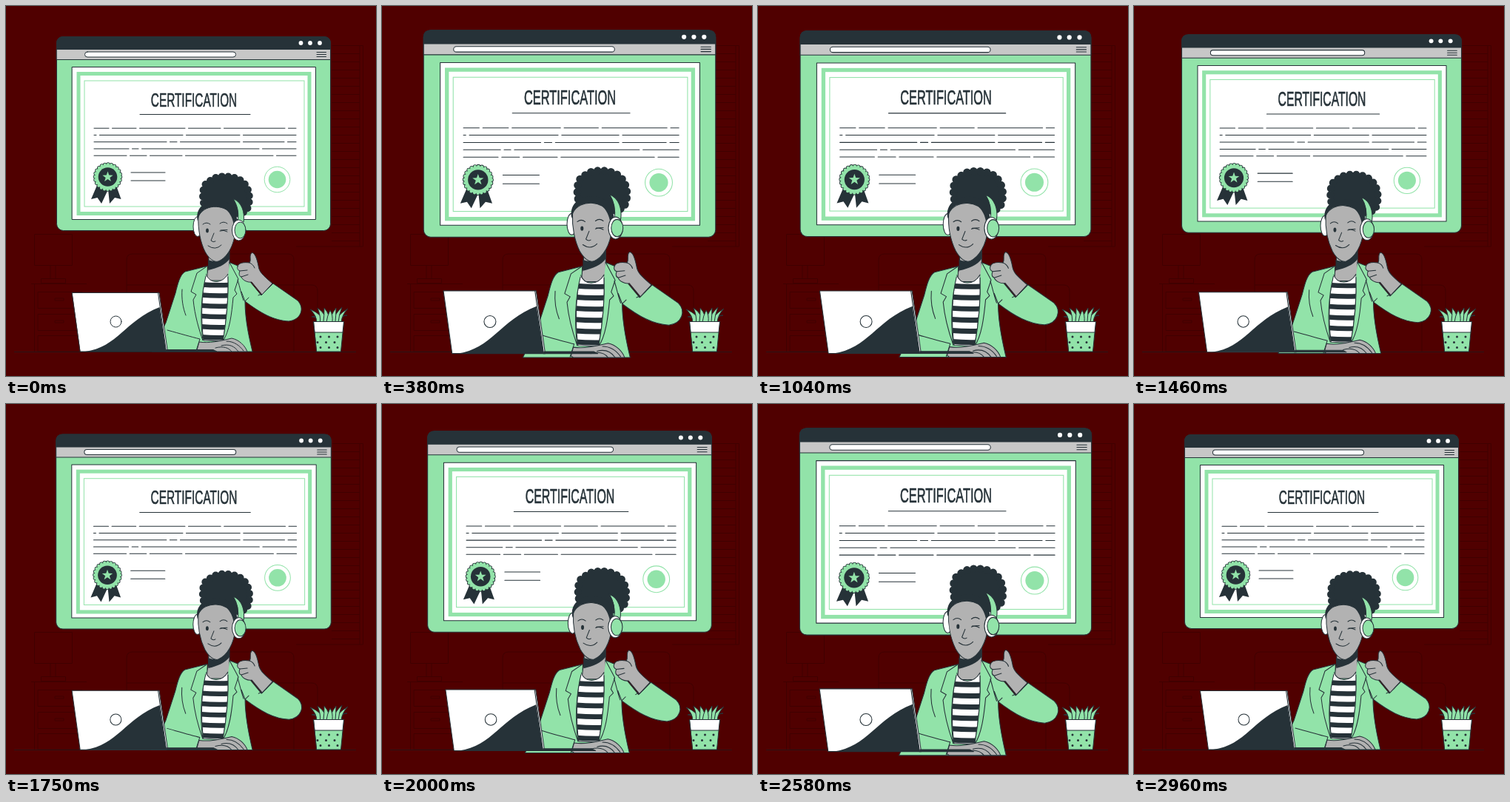
An HTML page that plays this animation: 500 by 500 pixels, repeating every 3 s.

```html
<!DOCTYPE html>
<html lang="en">
<head>
<meta charset="utf-8">
<title>Certification</title>
<style>
  html, body { margin: 0; height: 100%; overflow: hidden; background: #500000; }
  svg { display: block; width: 100vw; height: 100vh; --ink: #263238; --green: #92e3a9; --skin: #b2b2b2; }
  .ink { fill: var(--ink); }
  .green { fill: var(--green); }
  .skin { fill: var(--skin); }
  .white { fill: #fff; }
  .line { stroke: var(--ink); stroke-width: 1; stroke-linejoin: round; stroke-linecap: round; }
  .none { fill: none; }
  .edge { stroke: var(--green); fill: none; }
  .room { fill: none; stroke: #400000; stroke-width: 1; }
  .bumps { stroke-linecap: round; }
  text { font: 26.5px "Liberation Sans", Arial, sans-serif; text-anchor: middle; stroke: var(--ink); stroke-width: .7; }
</style>
</head>
<body>
<svg viewBox="0 0 500 500">
  <g class="room">
    <path id="blinds"/>
    <path d="M38.5 308.5h51v42h-51zM60 350.5v18M67 350.5v18M47.5 368.5h33v6h-33zM34 375.5h75M38.5 375.5V467M43 386.5h60v22H43zM43 416.5h60v22H43zM43 445.5h60V467H43zM66 395h12v3H66zM66 425h12v3H66z"/>
    <path d="M163 467V343q0-8 8-8h210q8 0 8 8V467M163 377h226M389 377h24q8 0 8 8v82"/>
  </g>
  <path d="M11 467.5H473" class="none" stroke="#2b1517"/>

  <g id="window">
    <rect x="68.5" y="41.5" width="370" height="262" rx="9" class="green line"/>
    <path d="M68.5 58.500V50.500q0-9 9-9h352q9 0 9 9v8z" class="ink line"/>
    <path d="M68.500 58.500h370v14h-370z" fill="#c7c7c7" class="line"/>
    <rect x="106.500" y="62" width="204" height="7" rx="3.500" class="white line"/>
    <g class="white"><circle cx="398.500" cy="50" r="2.900"/><circle cx="411" cy="50" r="2.900"/><circle cx="424" cy="50" r="2.900"/></g>
    <path d="M420 62.500h12.500m-12.500 3h12.500m-12.500 3h12.500" class="none line"/>
    <rect x="89.500" y="82.500" width="329" height="206" class="white line"/>
    <rect x="98" y="91.500" width="312" height="189" class="edge" stroke-width="5"/>
    <rect x="106" y="101" width="297" height="170" class="edge"/>
    <text transform="translate(254 135.500) scale(.58 1)" class="ink">CERTIFICATION</text>
    <path d="M181 146.500H330M169 225H215M169 236H215" class="line"/>
    <path id="writing" class="line"/>
    <path d="M124 240L115 261L123.500 259L129 267L138 248L140 267L147 259L155.500 261L148 240z" class="ink"/>
    <circle cx="137.500" cy="231" r="17" class="none line bumps" style="stroke-width:5.500" stroke-dasharray="0 4.450"/>
    <circle cx="137.500" cy="231" r="17" class="green bumps" stroke="#92e3a9" stroke-width="4" stroke-dasharray="0 4.450"/>
    <circle cx="137.500" cy="231" r="12.800" class="ink"/>
    <path id="star" class="green"/>
    <circle cx="366.500" cy="234.500" r="17.300" class="edge"/>
    <circle cx="366.500" cy="234.500" r="11.800" class="green"/>
  </g>

  <g id="plant">
    <g id="leaves" class="green line"></g>
    <path d="M416 426.500H456.500L452.500 467H420z" class="green line"/>
    <path d="M416 426.500H456.500L455 441H417.500z" class="white line"/>
    <path d="M425 447h24M421 454.500h32M425 461.500h24" class="none line" style="stroke-width:3" stroke-dasharray="0 11.500"/>
  </g>

  <g id="person">
    <path d="M267 266C264 250 268 238 276 236C284 228 310 228 320 238C330 246 332 266 324 278L290 285z" class="ink line bumps" style="stroke-width:10" stroke-dasharray="0 8.500"/>
    <ellipse cx="259" cy="298" rx="6" ry="13.500" class="white line"/>
    <path d="M274 330L302 318V348C302 358 303 365 306 374L286 386L264 374C271 366 274 358 274 346z" class="skin line"/>
    <path d="M273 343C285 348 294 342 302 328V342C296 350 286 354 273.500 357z" class="ink"/>
    <path d="M272 351.500L242 359C235 363 232 376 229 388L216 428L197 467H333C329 450 323 425 323 399C344 415 362 425 382 426C399 424 404 408 394 398L361 375L345 391L331 374L318 353L302 346.500C303 358 303 364 300 371H270C273 365 272 358 272 351.500z" class="green line"/>
    <path d="M270 362C275 376 292 376 300 362C301 390 298 425 293 453L267 452C263 424 264 390 270 362z" class="white line"/>
    <clipPath id="shirt"><path d="M270 362C275 376 292 376 300 362C301 390 298 425 293 453L267 452C263 424 264 390 270 362z"/></clipPath>
    <path id="stripes" class="none" clip-path="url(#shirt)" stroke="#263238" stroke-width="6.500"/>
    <path d="M272 351.500L258 361L250 386L257 390L253 397C255 418 261 438 266 452C262 420 264 390 270 365M302 346.500L314 369L309 384L312 389L307 394C305 416 302 440 293 453C298 425 301 392 300 366" class="green line"/>
    <path d="M238 383C237 395 239 408 243 418M323 399L318 386M313 370C316 380 318 390 321 398M341 391C350 388 356 380 359 373M218 438C236 443 250 447 262 450L257 466M323 399L328 394" class="none line"/>
    <path d="M258 465L261 454C275 456 288 453 305 449C315 451 323 459 326 467H261z" class="skin line"/>
    <path d="M291 459C302 456 309 460 314 467M298 453C308 453 316 459 321 466M283 462C294 459 301 462 305 467" class="none line"/>
    <path d="M313 352C314 347 321 346 329 347C332 343 328 338 332 333.500C336 333 339 341 341 351C342 359 346 363 360 375L346 390L332 373C326 374 319 370 318 366C314 365 315 360 316 358C313 357 312 354 313 352z" class="skin line"/>
    <path d="M316 358L326 357M318 366L327 363M329 347C332 348 335 351 336 354" class="none line"/>
    <path d="M260 284C259 302 263 320 269 332C274 341 281 347 287 345C299 340 308 324 310 304L307 284C299 269 270 265 260 284z" class="skin line"/>
    <path d="M259 291C255 274 268 262 286 263C303 263 313 274 313 298L308 297C306 282 298 271 284 270C270 271 261 277 259 291z" class="ink"/>
    <path d="M307 260.500C319 265 323 279 321 292H313C315 279 313 270 307 260.500z" class="green line"/>
    <ellipse cx="314.500" cy="303" rx="9" ry="14" class="white line"/>
    <ellipse cx="316.500" cy="303" rx="7.500" ry="11" class="green line"/>
    <ellipse cx="272" cy="303.500" rx="1.900" ry="3" class="ink"/>
    <path d="M266 295Q271 291 276 295M289 294Q294 290 299 294M289 304Q294 302 299 305M290 303L299 302.500M281 307L277 317Q280 320 283 318M273 324Q283 331 291 323" class="none line"/>
  </g>

  <g id="laptop">
    <path d="M205 387.500H207L218.500 467H216z" class="white line"/>
    <path d="M89.500 387.500H205.500L216.500 467H100.500z" class="white line"/>
    <path d="M107 467C151 461 161 425 207.500 407L216.500 467z" class="ink"/>
    <circle cx="148.500" cy="426.500" r="7.500" class="white line"/>
    <path d="M217 464.500H280L285 467H217z" class="ink line"/>
  </g>
</svg>
<script>
  const $ = id => document.getElementById(id);
  const range = n => [...Array(n).keys()];

  $("blinds").setAttribute("d", "M440.500 53.500H482.500V325H392M478 53V325" +
    range(24).map(i => `M440 ${64.500 + i * 11}h38`).join(""));

  // Each row is a rule from x = 119 to 392 with short gaps at these places.
  const gaps = [
    [139, 176, 242, 290, 377],
    [122, 239, 316],
    [217, 231, 316, 376],
    [166, 179, 342],
    [163, 190, 238, 361],
  ];
  $("writing").setAttribute("d", gaps.map((row, i) => {
    const y = 165.200 + i * 9.250;
    return `M119 ${y}` + row.map(x => `H${x}M${x + 4.500} ${y}`).join("") + "H392";
  }).join(""));

  $("star").setAttribute("d", "M" + range(10).map(i => {
    const a = i * Math.PI / 5, r = i % 2 ? 3 : 7.500;
    return `${137.500 + r * Math.sin(a)} ${231 - r * Math.cos(a)}`;
  }).join("L") + "z");

  $("stripes").setAttribute("d", range(6).map(i => `M260 ${376 + i * 14.200}Q280 ${378 + i * 14.200} 304 ${377 + i * 14.200}`).join(""));

  const tips = [[413, 420], [461, 418], [411, 410], [462, 409], [421, 408], [454, 407], [430, 408], [446, 408], [438, 411]];
  $("leaves").innerHTML = tips.map(([x, y]) => {
    const b = 436 + (x - 436) * .5;
    return `<path d="M${b - 4} 427Q${b - 3} 419 ${x} ${y}Q${b + 5} 417 ${b + 4} 427z"/>`;
  }).join("");

  // Pulse strength over the loop: [ms, amount].
  const pulse = [[0, 0], [565, 1], [1702, 0], [1900, .177], [2170, .7], [2343, 1], [2580, .59], [2960, 0], [3000, 0]];
  const centers = { window: [253.500, 172.500], person: [298, 347], laptop: [187.500, 427] };
  const FRAME = 1000 / 24;

  function amount(t) {
    const i = pulse.findIndex(([end]) => end > t);
    const [t0, a] = pulse[i - 1], [t1, b] = pulse[i];
    return a + (b - a) * (t - t0) / (t1 - t0);
  }

  function draw() {
    const t = Math.floor(performance.now() % 3000 / FRAME) * FRAME;
    const s = 1 + .1 * amount(t);
    for (const [id, [x, y]] of Object.entries(centers))
      $(id).setAttribute("transform", `translate(${x} ${y}) scale(${s}) translate(${-x} ${-y})`);
    requestAnimationFrame(draw);
  }
  draw();
</script>
</body>
</html>
```
